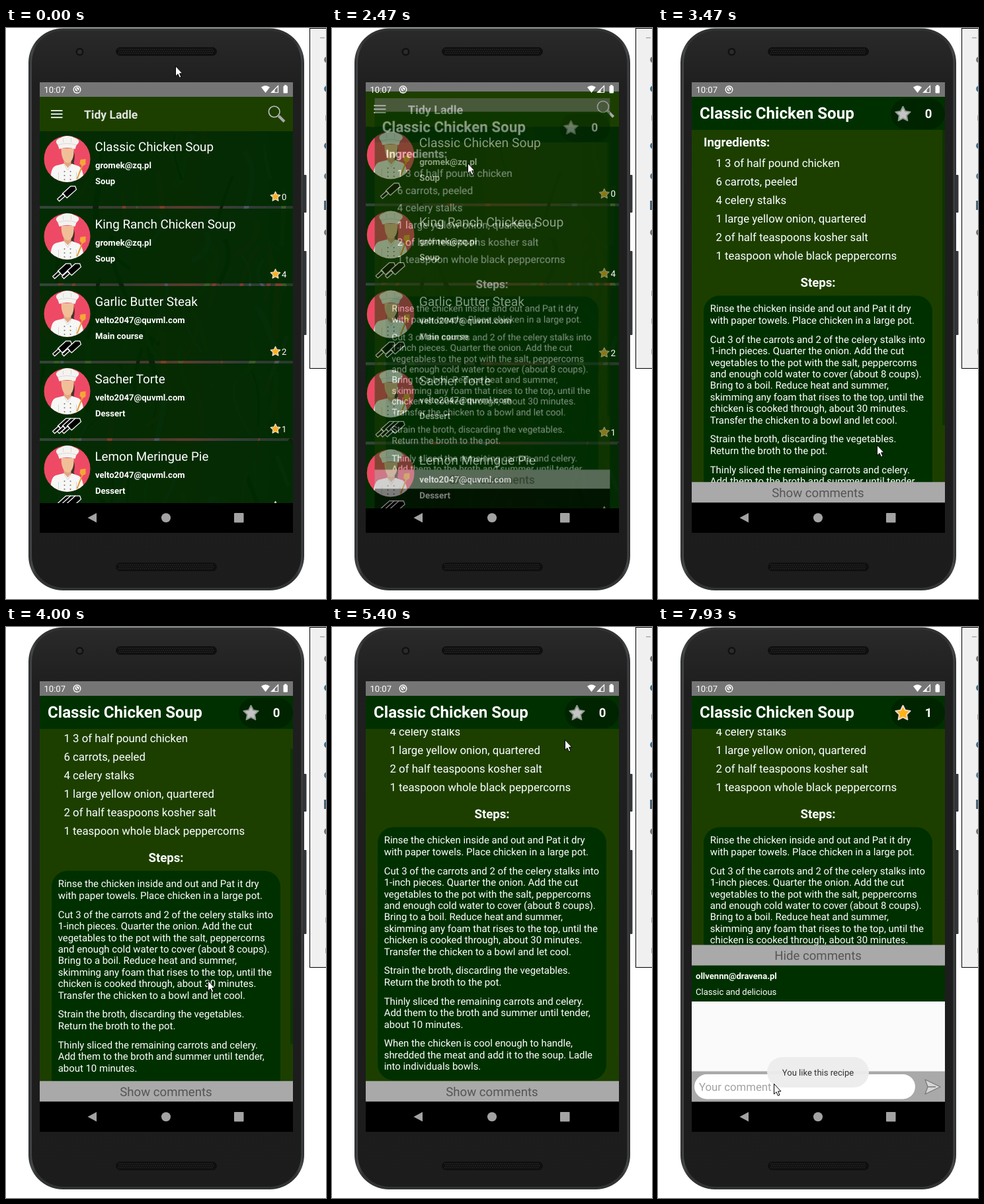
These frames come from a looping animation (484 by 863 pixels, 8000 ms). An HTML page with a canvas:

```html
<!DOCTYPE html>
<html lang="en">
<head>
<meta charset="utf-8">
<style>
  html, body { margin: 0; width: 484px; height: 863px; overflow: hidden; background: #fff; }
  canvas { display: block; }
</style>
</head>
<body>
<canvas id="stage" width="484" height="863"></canvas>
<script>
const W = 484, H = 863, LOOP = 8000, STEP = 200 / 3;
const stage = document.getElementById('stage').getContext('2d');
const layerCanvas = Object.assign(document.createElement('canvas'), { width: W, height: H });
const layer = layerCanvas.getContext('2d');
stage.textRendering = layer.textRendering = 'geometricPrecision';
let c = stage;

const DARK = '#003000', OLIVE = '#1c3f00', BAR = '#a9a9a9', WHITE = '#fff';
const recipes = [
  ['Classic Chicken Soup', 'gromek@zq.pl', 'Soup', 1, 0],
  ['King Ranch Chicken Soup', 'gromek@zq.pl', 'Soup', 2, 4],
  ['Garlic Butter Steak', 'velto2047@quvml.com', 'Main course', 2, 2],
  ['Sacher Torte', 'velto2047@quvml.com', 'Dessert', 3, 1],
  ['Lemon Meringue Pie', 'velto2047@quvml.com', 'Dessert', 3, 1]
];
const ingredients = ['1 3 of half pound chicken', '6 carrots, peeled', '4 celery stalks',
  '1 large yellow onion, quartered', '2 of half teaspoons kosher salt', '1 teaspoon whole black peppercorns'];
const steps = [
  ['Rinse the chicken inside and out and Pat it dry', 'with paper towels. Place chicken in a large pot.'],
  ['Cut 3 of the carrots and 2 of the celery stalks into', '1-inch pieces. Quarter the onion. Add the cut',
    'vegetables to the pot with the salt, peppercorns', 'and enough cold water to cover (about 8 coups).',
    'Bring to a boil. Reduce heat and summer,', 'skimming any foam that rises to the top, until the',
    'chicken is cooked through, about 30 minutes.', 'Transfer the chicken to a bowl and let cool.'],
  ['Strain the broth, discarding the vegetables.', 'Return the broth to the pot.'],
  ['Thinly sliced the remaining carrots and celery.', 'Add them to the broth and summer until tender,', 'about 10 minutes.'],
  ['When the chicken is cool enough to handle,', 'shredded the meat and add it to the soup. Ladle', 'into individuals bowls.']
];
// time, x, y of the pointer tip
const pointer = [
  [0, 256, 57], [133, 247, 50], [666, 247, 50], [1266, 205, 204], [2530, 205, 204], [3266, 325, 600],
  [3466, 331, 630], [3600, 331, 630], [4000, 305, 534], [4133, 299, 468], [4466, 283, 327], [4700, 288, 245],
  [5066, 300, 240], [5600, 383, 128], [5866, 381, 135], [6466, 381, 135], [6866, 295, 587], [7200, 323, 702],
  [7400, 323, 702], [7466, 320, 702], [7666, 320, 702], [7933, 175, 690], [8000, 175, 690]
];

const clamp = (v, lo = 0, hi = 1) => Math.min(hi, Math.max(lo, v));

function pointerAt(t) {
  const i = Math.max(1, pointer.findIndex(k => k[0] >= t));
  const [t0, x0, y0] = pointer[i - 1], [t1, x1, y1] = pointer[i];
  const p = clamp((t - t0) / (t1 - t0));
  return [x0 + (x1 - x0) * p, y0 + (y1 - y0) * p];
}

function rect(x, y, w, h, fill, r = 0) {
  c.fillStyle = fill;
  c.beginPath();
  c.roundRect(x, y, w, h, r);
  c.fill();
}
function disc(x, y, r, fill) { rect(x - r, y - r, 2 * r, 2 * r, fill, r); }
function shape(d, fill, stroke, width = 1) {
  const p = new Path2D(d);
  if (fill) { c.fillStyle = fill; c.fill(p); }
  if (stroke) { c.strokeStyle = stroke; c.lineWidth = width; c.stroke(p); }
}
function text(s, x, y, size, color = WHITE, weight = 400, align = 'left') {
  c.font = `${weight} ${size}px Roboto, sans-serif`;
  c.fillStyle = color;
  c.textAlign = align;
  c.fillText(s, x, y);
}
function group(draw, x = 0, y = 0, scale = 1) {
  c.save();
  c.translate(x, y);
  c.scale(scale, scale);
  draw();
  c.restore();
}
function clip(x, y, w, h) {
  c.beginPath();
  c.rect(x, y, w, h);
  c.clip();
}
function gradient(x, y, ...stops) {
  const g = c.createLinearGradient(34, 0, x, y);
  for (const [at, color] of stops) g.addColorStop(at, color);
  return g;
}
function random(seed) {
  return () => (seed = (seed * 16807) % 2147483647) / 2147483647;
}

function star(x, y, r, fill, stroke) {
  c.beginPath();
  for (let i = 0; i < 10; i++) {
    const a = Math.PI * (i / 5 - 0.5), q = i % 2 ? r * 0.5 : r;
    c.lineTo(x + q * Math.cos(a), y + q * Math.sin(a));
  }
  c.closePath();
  c.lineJoin = 'round';
  c.lineWidth = r * 0.17;
  c.fillStyle = fill;
  c.strokeStyle = stroke;
  c.fill();
  c.stroke();
}

function grille(y) {
  rect(166, y, 153, 13, '#0f0f0f', 6.5);
  c.fillStyle = '#2b2b2b';
  for (let i = 0; i < 48; i++)
    for (let j = 0; j < 3; j++) c.fillRect(170 + i * 3 + (j % 2) * 1.5, y + 2.5 + j * 3, 1.5, 1.5);
}

function drawPhone() {
  rect(0, 0, W, H, WHITE);
  rect(459, 0, 30, 515, '#000');
  rect(460, 1, 30, 513, '#f0f0f0');
  rect(475, 14, 7, 1.5, '#aaa');
  for (const [y, color] of [[48, '#777'], [92, '#44708c'], [178, '#44708c'], [224, '#5d7f92'], [309, '#777']])
    disc(486, y, 5, color);
  rect(481, 261, 3, 14, '#4b6575');
  for (const y of [136, 401, 443, 489]) rect(483, y - 4, 1, 8, '#aaa');
  rect(449, 222, 5.5, 57, '#34373a', 1);
  rect(449, 337, 5.5, 127, '#34373a', 1);
  rect(34, 0.5, 417, 849.5, gradient(451, 0, [0, '#2b2d2e'], [0.012, '#464849'],
    [0.03, '#303233'], [0.97, '#303233'], [0.988, '#464849'], [1, '#2b2d2e']), 52);
  rect(39, 4, 407.5, 842, gradient(34, 850, [0, '#2a2a2a'], [0.1, '#1f1f1f'], [1, '#1c1c1c']), 48);
  grille(29);
  grille(808);
  disc(111.5, 36, 6, '#111');
  disc(111.5, 36, 3.5, '#2a2b2e');
}

function drawChef() {
  c.beginPath();
  c.arc(0, 0, 35, 0, 7);
  c.clip();
  rect(-36, -36, 72, 72, '#ee4a66');
  shape('M6-17Q14-10 10 6Q14 12 8 15L3 8Z', '#49302c');
  rect(-5, -2, 11, 14, '#e3a77f');
  shape('M-9-16H10Q11 4 1 6Q-9 4-9-16Z', '#f0bf98');
  shape('M-25 36Q-26 13-17 10L-5 7L1 13L7 7L18 11Q25 16 25 36Z', '#f7f7f5');
  shape('M-13 20V36M14 20V36M-4 9L1 17L6 9', null, '#d5d5d5');
  for (let i = 0; i < 6; i++) disc(-4 + (i % 2) * 9, 19 + (i >> 1) * 6, 1, '#777');
  shape('M-12-15L-14-21Q-21-28-10-32Q1-39 11-32Q23-28 14-21L12-15Q0-19-12-15Z', '#f4f3f0');
  shape('M-14-21Q0-26 14-21M-6-31V-25M6-32V-25', null, '#d9d7d2');
  shape('M24 7L15 30', null, '#e69a2e', 2);
  shape('M20 1L28 0L28 8L23 11L19 7Z', '#f5a638');
}

function drawCleaver() {
  c.rotate(-0.73);
  c.lineJoin = 'round';
  shape('M-17-2.5H-5V2H-17ZM-6-3.5H11L16 1L14 6H-5Z', '#000', WHITE, 1.3);
}

function drawPhotoBackdrop() {
  rect(51, 156, 383, 570, gradient(434, 0, [0, '#34463c'], [0.35, '#3a3a30'], [0.6, '#5c3a30'], [0.8, '#343d38'], [1, '#2a382c']));
  const rnd = random(77);
  for (let i = 0; i < 110; i++) {
    const x = 51 + rnd() * 383, y = 150 + rnd() * 570, n = rnd();
    const color = n < 0.3 ? '#7d3c2c' : n < 0.6 ? '#3c5a2a' : n < 0.8 ? '#4b5563' : '#111c10';
    shape(`M${x} ${y}q${rnd() * 50 - 25} 25 ${rnd() * 60 - 30} ${40 + rnd() * 50}`, null, color, 2 + rnd() * 7);
  }
}

function drawList() {
  rect(51, 82, 383, 22, '#757575');
  drawPhotoBackdrop();
  rect(51, 104, 383, 52, OLIVE);
  for (const y of [124, 129.2, 134.4]) rect(68, y, 17.5, 1.7, WHITE);
  text('Tidy Ladle', 118, 137, 17.5, '#e2e4df', 700);
  shape('M412.5 133L421 141.5', null, '#aaa', 4);
  c.beginPath();
  c.arc(405.7, 126.5, 8.3, 0, 7);
  c.strokeStyle = '#c2c2c2';
  c.lineWidth = 1.6;
  c.stroke();
  c.save();
  clip(0, 82, W, 636);
  recipes.forEach(([name, author, kind, level, likes], i) => group(() => {
    rect(51, 0, 383, 113, 'rgba(0,43,0,.93)');
    group(drawChef, 92.5, 42);
    for (let k = 0; k < level; k++) {
      const shift = level === 1 ? 0 : -7 + 14 * k / (level - 1);
      group(drawCleaver, 92 + shift, 93);
    }
    text(name, 134.5, 30, 18.8);
    text(author, 135, 56, 13.05, WHITE, 700);
    text(kind, 135, 79.5, 13.05, WHITE, 700);
    star(407.5, 99, 7.5, '#fbb01c', '#f1dfcf');
    text(likes, 417, 103.5, 13.05);
  }, 0, 156 + 117 * i));
  c.restore();
}

function drawScroll(scroll) {
  c.translate(0, -scroll);
  text('Ingredients:', 69, 179.4, 18.64, WHITE, 700);
  ingredients.forEach((s, i) => text(s, 87.5, 210.2 + 28 * i, 16.78));
  text('Steps:', 242, 391.4, 18.64, WHITE, 700, 'center');
  rect(69, 404.5, 346, 282, DARK, 24);
  rect(69, 500, 346, 287, DARK, 24);
  let y = 429.4;
  for (const paragraph of steps) {
    for (const line of paragraph) {
      text(line, 78.7, y, 14.91);
      y += 17.4;
    }
    y += 11.5;
  }
}

function drawGlow(t) {
  const pull = clamp((t - 4133) / 333, 0, 1.2) * clamp(1 - (t - 4900) / 500);
  if (!pull) return;
  const h = 49 * pull, edge = 686 - h * 0.16;
  shape(`M51 687V${edge}Q242 ${686 - h * 1.84} 434 ${edge}V687Z`, `rgba(115,150,120,${0.33 * clamp(pull)})`);
}

function drawComments() {
  rect(51, 512, 383, 54, DARK);
  text('ollvennn@dravena.pl', 57, 532, 13.05, WHITE, 700);
  text('Classic and delicious', 57, 556, 13.05);
  rect(51, 566, 383, 106, '#fafafa');
  rect(51, 671.5, 383, 46, BAR);
  rect(55, 676, 334, 37.5, WHITE, 19);
  text('Your comment', 62, 701, 16.78, '#a2a2a2');
  c.lineJoin = 'round';
  shape('M404 684L427 695L404 706L408 695ZM408 695H420', '#d6d6d6', '#777', 1.3);
}

function drawDetail(t, scroll) {
  const open = t >= 7660, liked = t >= 6260, barY = open ? 480.6 : 686.3;
  rect(51, 82, 383, 22, '#757575');
  rect(51, 104, 383, 613, OLIVE);
  rect(51, 717, 383, 46, '#000');
  c.save();
  clip(51, 154, 383, 533);
  group(() => drawScroll(scroll));
  const thumb = clamp((5350 - t) / 250);
  rect(430, 154 + scroll * 0.843, 4, 446, `rgba(0,48,0,${0.6 * thumb})`);
  drawGlow(t);
  c.restore();
  rect(51, 104, 383, 50, DARK);
  rect(352, 107, 82, 46, 'rgba(0,0,0,.25)', 23);
  text('Classic Chicken Soup', 63, 136.8, 24.1, WHITE, 700);
  star(370.5, 130.5, 11.7, liked ? '#fdb315' : '#c4c4c4', liked ? '#f3d9cd' : '#8f9a8f');
  text(liked ? 1 : 0, 409, 136, 18.64, WHITE, 700, 'center');
  rect(51, barY, 383, 31, BAR);
  text(open ? 'Hide comments' : 'Show comments', 242, barY + 22.6, 18.64, '#555', 400, 'center');
  if (open) drawComments();
}

function drawToast(t) {
  c.globalAlpha = clamp((t - 6290) / 200);
  rect(165, 650, 154, 46, 'rgba(236,236,236,.95)', 23);
  text('You like this recipe', 242, 678, 13.05, '#333', 400, 'center');
  c.globalAlpha = 1;
}

function drawSystemIcons() {
  text('10:07', 57.5, 98, 13.05);
  disc(107.5, 93, 6, WHITE);
  disc(107.5, 93, 4.6, '#757575');
  disc(107.5, 92.5, 3, WHITE);
  shape('M106 91L111 97', null, '#757575', 1.2);
  shape('M386 89.5Q392.5 84.5 399 89.5L392.5 98Z', WHITE);
  shape('M401.5 97.5L411.5 87.5V97.5Z', null, WHITE, 1.2);
  shape('M406.5 92.5V98H401Z', WHITE);
  rect(419.5, 87.5, 6.5, 11, WHITE, 1);
  rect(421.2, 86, 3, 2, WHITE);
  shape('M137 733V747.5L123.5 740.2Z', '#a3a3a3');
  disc(242, 740.3, 7, '#a3a3a3');
  rect(345, 733, 14.5, 14.5, '#a3a3a3', 1);
}

function drawPointer([x, y]) {
  c.lineJoin = 'miter';
  group(() => shape('M.5 .5V16L4 12.7L6.5 18.3L9 17.2L6.6 11.8H11Z', WHITE, '#000'), x, y);
}

function draw(t) {
  const tip = pointerAt(t);
  const scroll = t < 3600 ? 0 : t > 4200 ? 102 : clamp(570 - tip[1], 0, 102);
  const entering = t >= 2460;
  const settle = entering ? Math.exp(-(t - 2466) / 70) : 1;

  c = stage;
  drawPhone();
  c.save();
  clip(51, 82, 383, 681);
  rect(51, 82, 383, 681, '#000');
  if (t < 3300) {
    const grow = entering ? 1.0256 + 0.05 * (1 - settle) : 1;
    group(() => {
      c.translate(-242, -414);
      clip(51, 82, 383, 636);
      drawList();
    }, 242, 414, grow);
  }
  if (entering) {
    c = layer;
    c.clearRect(0, 0, W, H);
    drawDetail(t, scroll);
    c = stage;
    c.globalAlpha = t < 2500 ? 0.5 : 1;
    const scale = t < 3100 ? 1 - 0.0716 * settle : 1;
    group(() => c.drawImage(layerCanvas, -242, -422), 242, 422, scale);
    c.globalAlpha = 1;
  }
  drawSystemIcons();
  drawToast(t);
  c.restore();
  drawPointer(tip);
}

function tick() {
  const t = performance.now() % LOOP;
  draw(Math.floor((t + 4) / STEP) * STEP % LOOP);
  requestAnimationFrame(tick);
}
tick();
</script>
</body>
</html>
```
